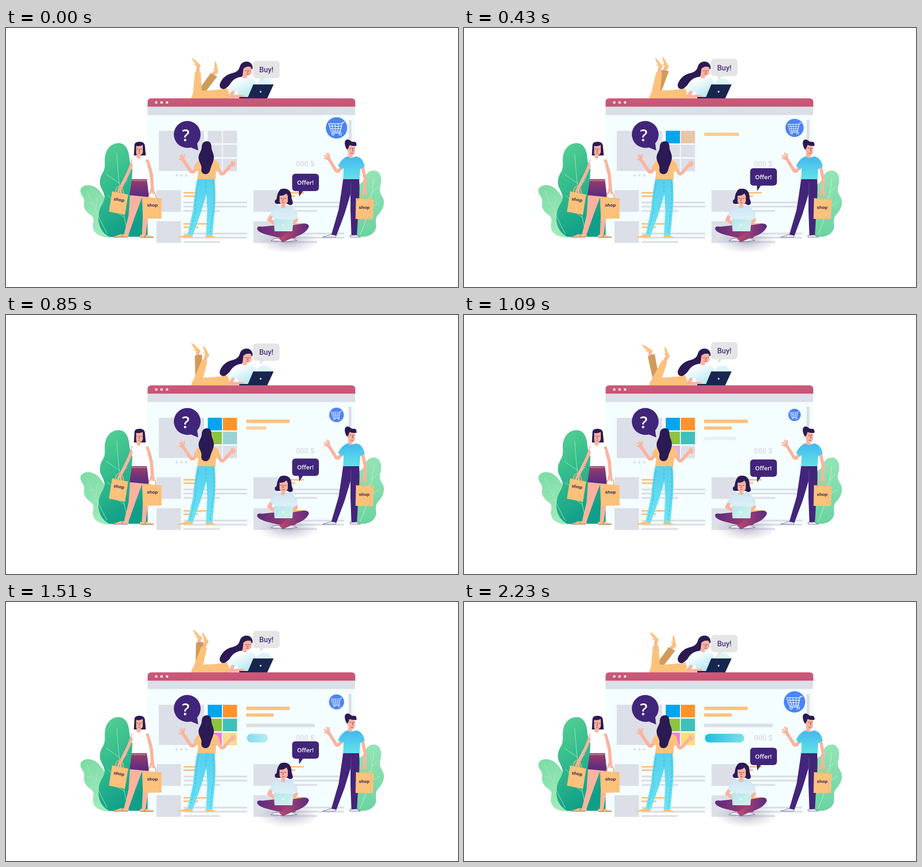
These frames come from a looping animation (988x567 px, 2.33 s). An HTML page:

```html
<!DOCTYPE html>
<html lang="en">
<head>
<meta charset="utf-8">
<title>Online shop</title>
<style>
html, body { margin: 0; width: 100%; height: 100%; overflow: hidden; background: #fff; }
svg { display: block; width: 988px; height: 567px; }
.skin { fill: #fbb39f; }
.dark { fill: #2b1a54; }
.gold { fill: #fcc27c; }
.grey { fill: #dcdfe7; }
.limb { fill: none; stroke: #fbb39f; stroke-linecap: round; stroke-linejoin: round; }
.line { fill: none; stroke-linecap: round; stroke-linejoin: round; }
.face { fill: none; stroke: #5c3050; stroke-width: .9; stroke-linecap: round; }
.shop { font: bold 9.8px "Liberation Sans", Arial, sans-serif; fill: #2b1a54; text-anchor: middle; }
.say { font-family: Roboto, sans-serif; font-weight: 500; text-anchor: middle; }
</style>
</head>
<body>
<svg viewBox="0 0 988 567">
<defs>
  <linearGradient id="bar" x2="0" y2="1"><stop stop-color="#cf587a"/><stop offset="1" stop-color="#c45675"/></linearGradient>
  <linearGradient id="leafA" x2=".4" y2="1"><stop stop-color="#5ad292"/><stop offset=".45" stop-color="#35bd8d"/><stop offset="1" stop-color="#0f9f88"/></linearGradient>
  <linearGradient id="leafB" x2=".4" y2="1"><stop stop-color="#7adba3"/><stop offset="1" stop-color="#a0eabb"/></linearGradient>
  <linearGradient id="leafC" x2="0" y2="1"><stop stop-color="#94e5b4"/><stop offset="1" stop-color="#6bd3a1"/></linearGradient>
  <linearGradient id="skirt" x2="0" y2="1"><stop stop-color="#9b3d68"/><stop offset="1" stop-color="#562a84"/></linearGradient>
  <linearGradient id="tee" x2="0" y2="1"><stop stop-color="#42b8ee"/><stop offset="1" stop-color="#62e2e8"/></linearGradient>
  <linearGradient id="jeans" x2="0" y2="1"><stop stop-color="#56d0ee"/><stop offset="1" stop-color="#6be4f4"/></linearGradient>
  <linearGradient id="button"><stop stop-color="#20bce2"/><stop offset="1" stop-color="#7fdee9"/></linearGradient>
  <linearGradient id="blouse" x2=".7" y2="1"><stop offset=".3" stop-color="#fafdfe"/><stop offset="1" stop-color="#b5e7f0"/></linearGradient>
  <linearGradient id="sweater" x2="0" y2="1"><stop stop-color="#c9e4f2"/><stop offset="1" stop-color="#e2f3f8"/></linearGradient>
  <linearGradient id="lap" x2="1" y2="1"><stop stop-color="#b5e6ee"/><stop offset="1" stop-color="#d3f3ea"/></linearGradient>
  <linearGradient id="kneeL"><stop stop-color="#5b2a80"/><stop offset="1" stop-color="#b2426b"/></linearGradient>
  <linearGradient id="kneeR"><stop stop-color="#c04a6b"/><stop offset="1" stop-color="#5b2a80"/></linearGradient>
  <radialGradient id="shade"><stop stop-color="#8f8aa8" stop-opacity=".6"/><stop offset="1" stop-color="#a9a6bd" stop-opacity="0"/></radialGradient>
  <g id="foot">
    <path class="skin" d="M415.500 98L416.500 83H423V98Z"/>
    <path class="gold" d="M406 66Q412 68 417 74L425 81Q426 85 423 87Q419 86 416 83L409 80L415 80Q410 75 406 66Z"/>
  </g>
</defs>

<!-- plants -->
<path fill="url(#leafB)" d="M163 353C170 339 193 342 205 357C214 368 222 380 225 400L235 458C212 461 190 452 190 434C190 423 195 418 186 410C171 400 169 390 171 380C172 369 161 366 163 353Z"/>
<path fill="url(#leafA)" d="M245 252C258 251 267 262 269 280C271 300 274 311 289 325C308 341 311 365 309 394L311 457H226C207 448 199 427 203 406C206 386 218 381 215 366C212 353 202 347 206 330C209 316 217 315 216 295C214 270 226 253 245 252Z"/>
<path class="line" stroke="#a9e9c8" stroke-width="1" d="M242 276C246 335 252 395 268 456M248 340L219 320M249 350L265 333M255 395L222 366M259 415L235 398M176 355C190 385 205 420 221 450M192 385L178 382M203 408L191 404M197 393L199 371"/>
<path fill="url(#leafC)" d="M805 312C818 313 823 329 819 343C815 355 818 362 823 370C830 382 824 398 815 407C806 416 809 424 809 434C809 447 795 458 778 457H766L768 345C778 339 784 332 786 325C789 316 796 312 805 312Z"/>
<path class="line" stroke="#c7f2d7" stroke-width="1" d="M804 330C799 370 790 420 774 452M800 361L813 347M794 395L816 382M798 377L786 361M788 417L802 410"/>

<!-- browser window -->
<path fill="#f4fdff" d="M309.500 190H763V457H309.500Z"/>
<path fill="url(#bar)" d="M309.500 172.500V162Q309.500 154 318 154H754.500Q763.500 154 763.500 162V172.500Z"/>
<path class="grey" d="M309.500 172.500H763V190.500H309.500ZM749 201H755V270H749ZM334 225H433V313H334ZM371 320.500h4.500v4.500h-4.500ZM381 320.500h4.500v4.500h-4.500ZM391.500 320.500h4.500v4.500h-4.500Z"/>
<g fill="#fff"><circle cx="328.500" cy="163" r="2.600"/><circle cx="340" cy="163" r="2.600"/><circle cx="352" cy="163" r="2.600"/></g>
<g id="page"></g>
<text x="634" y="303" fill="#dcdee5" style="font:bold 16px 'Liberation Sans',Arial,sans-serif">000 $</text>
<g id="cart">
  <circle cx="722.500" cy="218.700" r="23.400" fill="#4c84f5"/>
  <g class="line" stroke="#eef4ff" stroke-width="1.300">
    <path stroke-width="1.800" d="M739 206.500L734.500 207.500L730 229.500H712"/>
    <path d="M705.500 209.500H733.500M705.500 209.500L710.500 226H730M707 215H732M709 220.500H731M712 209.500L715.500 226M719 209.500L720.500 226M726.500 209.500L725.500 226"/>
    <circle cx="715" cy="232" r="2.600"/><circle cx="730.500" cy="232" r="2.600"/>
  </g>
</g>

<!-- lying shopper -->
<g id="farLeg"><use href="#foot"/><path fill="#d09b59" d="M414 147L413.500 92L428.500 90L427 147Z"/></g>
<g id="nearLeg"><use href="#foot"/><path class="gold" d="M408 152L413 96Q419 94 425.500 96L428 138L422 150Z"/></g>
<path class="gold" d="M405 154Q405 146 412 142L428 137Q455 137 486 132L489 154Z"/>
<path class="dark" d="M525 73.500C534 73 540 80 539 89L520 101C514 107 513 113 503 115C491 118 490 126 479 133C470 136 465 128 468 121C473 109 482 102 494 99C506 96 509 91 511 85C513 78 518 74 525 73.500Z"/>
<path class="skin" d="M519 89Q527 82 536 86L537 99Q533 105 527 104L526 112H516Z"/>
<path class="face" d="M523 93.500q2 1.500 3.500 0M531.500 93.500q1.500 1.500 3 0M529 93v5l-2 0M526 101q2.500 1.500 4.500 0"/>
<path fill="url(#blouse)" d="M513 107Q524 113 533 108Q546 111 546 123L534 151H509L505 137L493 146L484 136Q492 110 513 107Z"/>
<path class="limb" stroke-width="7" d="M496 141L490 150L517 150"/>
<path fill="#d9f5f9" d="M546 122L558 111L574 112L583 123Z"/>
<path fill="#18264f" d="M540.500 123.500H585L571 154H510V151H529Z"/>
<circle cx="556.500" cy="139.500" r="1.900" fill="#e8f0fa"/>
<g id="buy">
  <path fill="#e5e5e6" d="M548 72H590Q598 72 598 80V102Q598 110 590 110H564L555 119V110H548Q540 110 540 102V80Q540 72 548 72Z"/>
  <text class="say" x="569" y="97" font-size="16" fill="#48307f">Buy!</text>
</g>

<!-- shopper with two bags -->
<path class="skin" d="M271 366H299L283 409L267 455H257L268 410ZM297 366H312L310 420L305 455H297L299 412Z"/>
<path class="gold" d="M233 457Q243 455 251 451L267 453V458H233ZM293 458V453L306 452Q315 456 323 456V458Z"/>
<path class="line" stroke="#3d2a5c" stroke-width=".8" d="M234 458H266M294 458.500H322M252 452l3 4M306 452l-3 5"/>
<path class="limb" stroke-width="7" d="M277 291Q270 313 260 331L250 351M309 291Q315 308 318 323L320 352"/>
<path class="dark" d="M281 255Q282 249 292 249Q302 249 303.500 257L305.500 279H279.500Z"/>
<path class="skin" d="M284.500 258Q292 260 299 256V272Q297 278 293.500 278L295 288H284L286 278Q284 276 284.500 270Z"/>
<path class="face" d="M286 265q1.500 1 3 0M294 265q1.500 1 3 0M291.500 264v6l-2 0M289 274q2 1 4 0"/>
<path fill="#fff" d="M279 280L284 281Q290 291 298 281L303 282Q304 290 309 297L308 331H275L277 300L274 293Q278 289 279 280Z"/>
<path fill="url(#skirt)" d="M275 331H308L312.500 370L270 366Z"/>
<path class="line" stroke="#ede3ef" stroke-width="1" stroke-dasharray="3 2" d="M276 334H307"/>
<g class="line" stroke="#eeb06c" stroke-width="2"><path d="M239 361Q240 347 248 347Q256 349 257 364M312 373Q312 357 320 357Q327 358 328 373"/></g>
<path class="limb" stroke-width="4" d="M246 354L245 360M250 353L251 361M317 353L316 361M322 353V362"/>
<path class="gold" d="M232 358L267 365L260 409L225 402ZM300 370L340 374L340 417L299 418Z"/>
<path class="line" stroke="#efb472" stroke-width="1" d="M232 358L267 365M300 370L340 374M335 374V417"/>
<text class="shop" transform="translate(246.500 379) rotate(9)">shop</text>
<text class="shop" x="320" y="391">shop</text>

<!-- shopper seen from behind -->
<path class="limb" stroke-width="7" d="M422 300L411 314Q405 317 402 311L388 290M461 301L469 317Q472 322 477 317L490 302"/>
<path class="limb" stroke-width="3" d="M388 290L380 280M388 288L384 277M388 288L390 277M388 290L379 287M490 302L499 292M491 301L494 292M491 301L502 296M491 303L500 301"/>
<path class="gold" d="M426 288H453Q464 291 466 301L468 309L459 315L458 332H418L420 314L410 306Q415 292 426 288Z"/>
<path fill="url(#jeans)" d="M418 331H456Q459 362 457 393L451 455H437L440 400L438 364L425 407L408 455L397 452L409 398Q412 360 418 331Z"/>
<path class="line" stroke="#3ba6c8" stroke-width=".9" stroke-dasharray="5 4" d="M420 340Q413 380 414 402L402 449M453 336Q456 375 451 408L446 452M437 336V360"/>
<path class="gold" d="M375 458Q385 456 395 451L408 455V459H375ZM436 459V454H450Q454 457 458 457V459Z"/>
<path class="dark" d="M438 248C446 247 449 253 449 260C449 269 456 276 454 287C452 297 448 302 446 312Q442 321 435 320Q426 318 427 309C429 299 420 293 421 282C422 273 428 269 428 259Q429 249 438 248Z"/>
<path fill="#41257a" d="M396 203.500a29.500 29.500 0 0 1 22 49L420 268L404 261.500A29.500 29.500 0 1 1 396 203.500Z"/>
<text x="393" y="247.500" fill="#fff" text-anchor="middle" style="font:600 36px 'Open Sans','Noto Sans',sans-serif">?</text>

<!-- seated shopper -->
<ellipse cx="617" cy="467" rx="68" ry="27" fill="url(#shade)"/>
<path fill="url(#kneeL)" d="M560 435Q548 433 549 440Q551 448 576 454L604 461L632 460L636 452L606 432H588Z"/>
<path fill="url(#kneeR)" d="M597 461L625 442L622 432L652 428Q662 428 662 435Q657 448 636 456L604 469Z"/>
<path fill="#eef2f8" stroke="#51447a" stroke-width=".8" d="M579 466Q587 459 597 461L604 467ZM606 468L624 460L636 465Q624 467 606 468Z"/>
<path class="limb" stroke-width="8" d="M583 406L575 420L589 429M632 406L634 421L625 429"/>
<path fill="url(#sweater)" d="M597 388H617Q635 394 638 416L626 421L623 430H589L586 415L577 410Q583 393 597 388Z"/>
<path class="line" stroke="#fff" stroke-width="1.500" stroke-dasharray="0 5" d="M590 398H630M588 403H632M590 408H633M592 413H630"/>
<path class="dark" d="M592 371C594 358 599 351 606 352C617 350 624 359 624 369C624 377 629 381 626 386Q620 390 616 385H594Q586 386 588 377Q592 376 592 371Z"/>
<path class="skin" d="M598 367Q608 368 613 362L616 368V380Q613 387 609 387L611 392Q606 396 601 392L602 386Q597 383 598 376Z"/>
<path class="face" d="M600 373q2 1.500 4 0M608.500 373q2 1.500 4 0M606 373v5h-2M604 382q2.500 1.500 5 0"/>
<path fill="url(#lap)" d="M585 418L628 420L626 445H587Z"/>
<circle cx="605.500" cy="431.500" r="1.700" fill="#fff"/>
<g id="offer">
  <path fill="#41257a" d="M633 319H676Q684 319 684 327V349Q684 357 676 357H649L641 369L640 357H633Q625.500 357 625.500 349V327Q625.500 319 633 319Z"/>
  <text x="654.500" y="343" fill="#fff" text-anchor="middle" style="font:600 13px 'Open Sans','Noto Sans',sans-serif">Offer!</text>
</g>

<!-- shopper with one bag -->
<path class="limb" stroke-width="7" d="M736 302L727 313Q722 315 719 308L706 287M779 303L785 330L784 357"/>
<path class="limb" stroke-width="3" d="M706 287L696 279M706 286L701 274M707 287L706 275M706 288L696 285"/>
<path fill="#43257a" d="M737 330H772Q774 365 770 400L767 455H755L753 400V364L740 407L722 455L711 453L727 398Q733 360 737 330Z"/>
<path class="line" stroke="#6a4a9c" stroke-width="1" d="M754 340V366"/>
<path fill="#eef0f7" stroke="#51447a" stroke-width=".8" d="M692 458Q701 455 710 452L721 454V458ZM752 458V454L766 453L775 458Z"/>
<path fill="url(#tee)" d="M746 281Q756 286 765 281Q781 284 784 304L774 309L773 331H737L738 306L735 310L726 302Q733 286 746 281Z"/>
<path class="skin" d="M747 256H762L763 271Q761 279 756 279L759 283Q754 287 748 282V270Q744 268 746 264Z"/>
<path class="dark" d="M745 266Q739 256 741 248Q745 241 752 246Q756 250 762 249Q767 250 766 258Q757 259 751 256L748 264Z"/>
<path class="face" d="M752 263.500q1.500-1 3 0M759 263.500q1.500-1 3 0M757.500 263v6h2M754 274q2.500 1 4.500 0"/>
<path class="line" stroke="#eeb06c" stroke-width="2" d="M775 375Q776 358 783 358Q791 360 792 375"/>
<path class="limb" stroke-width="4" d="M781 357L780 364M786 357L787 364"/>
<path class="gold" d="M765 373L804 375L802 418L764 418Z"/>
<path class="line" stroke="#efb472" stroke-width="1" d="M765 373L804 375M798 375L797 418"/>
<text class="shop" x="783" y="396">shop</text>
</svg>
<script>
const $ = id => document.getElementById(id);
const page = $('page');
const GREY = '#dcdfe7', GOLD = '#fcc27c';

function box(x, y, w, h, fill, round = 0) {
  const r = document.createElementNS('http://www.w3.org/2000/svg', 'rect');
  const attrs = { x, y, width: w, height: h, fill, rx: round };
  for (const name in attrs) r.setAttribute(name, attrs[name]);
  return page.appendChild(r);
}

// product cards
for (const x of [329, 541]) for (const y of [355, 423]) {
  box(x, y, 53.5, 47.5, GREY);
  box(x + 59, y + 4, 51, 3.5, GOLD);
  box(x + 59, y + 11.5, 32, 3.5, GOLD);
  [[25, 139], [34, 139], [43.5, 80]].forEach(([dy, w]) => box(x + 59, y + dy, w, 4, GREY));
}

// colour, first step and last step of each fade
const swatches = [
  ['#00a5f0', 0, 10], ['#ff942b', 8, 20], ['#8cc43f', 13, 25],
  ['#3fc1ba', 21, 33], ['#ee7fe0', 28, 40], ['#ffdf73', 38, 51]
].map(([fill, from, to], i) => {
  const at = [441 + i % 2 * 33, 225 + (i >> 1) * 30.5, 31, 27.5];
  box(...at, GREY);
  return { el: box(...at, fill), from, to };
});

const strips = [
  [525, 229, 95, 7.5, GOLD, 0], [525, 244, 60, 7, GOLD, 15],
  [525, 266.5, 150, 7.5, GREY, 27], [526.5, 288.5, 86, 19, 'url(#button)', 40, 9.5]
].map(([x, y, w, h, fill, from, round]) => ({ el: box(x, y, w, h, fill, round), w, from }));

const clamp = v => Math.max(0, Math.min(1, v));
const hop = [[0, 0], [15, -15], [31, 0], [47, -15], [64, 0], [72, 0]];

function along(keys, k) {
  const i = Math.max(1, keys.findIndex(key => key[0] >= k));
  const [a, u] = keys[i - 1], [b, v] = keys[i];
  return u + (v - u) * (k - a) / (b - a);
}

function set(id, transform) { $(id).setAttribute('transform', transform); }

function pose(ms) {
  const k = ms < 100 ? 0 : Math.min(72, Math.floor((ms - 100) / 30) + 1);
  const swing = 1 - Math.abs(k - 36) / 36;

  set('nearLeg', `rotate(${24.5 * swing} 415 146)`);
  set('farLeg', `translate(415 146) rotate(${36 - 50.7 * swing}) scale(1.06) translate(-415 -146)`);
  set('buy', `translate(0 ${-13.5 * swing})`);
  set('offer', `translate(0 ${along(hop, k)})`);
  set('cart', `translate(722.5 218.7) scale(${1 - .445 * swing}) translate(-722.5 -218.7)`);

  for (const { el, from, to } of swatches) el.setAttribute('opacity', clamp((k - from) / (to - from)));
  for (const { el, w, from } of strips) {
    const p = clamp((k - from) / 15);
    el.setAttribute('width', w * p);
    el.setAttribute('opacity', p);
  }
}

const start = performance.now();
function tick() {
  pose((performance.now() - start) % 2330);
  requestAnimationFrame(tick);
}
tick();
</script>
</body>
</html>
```
